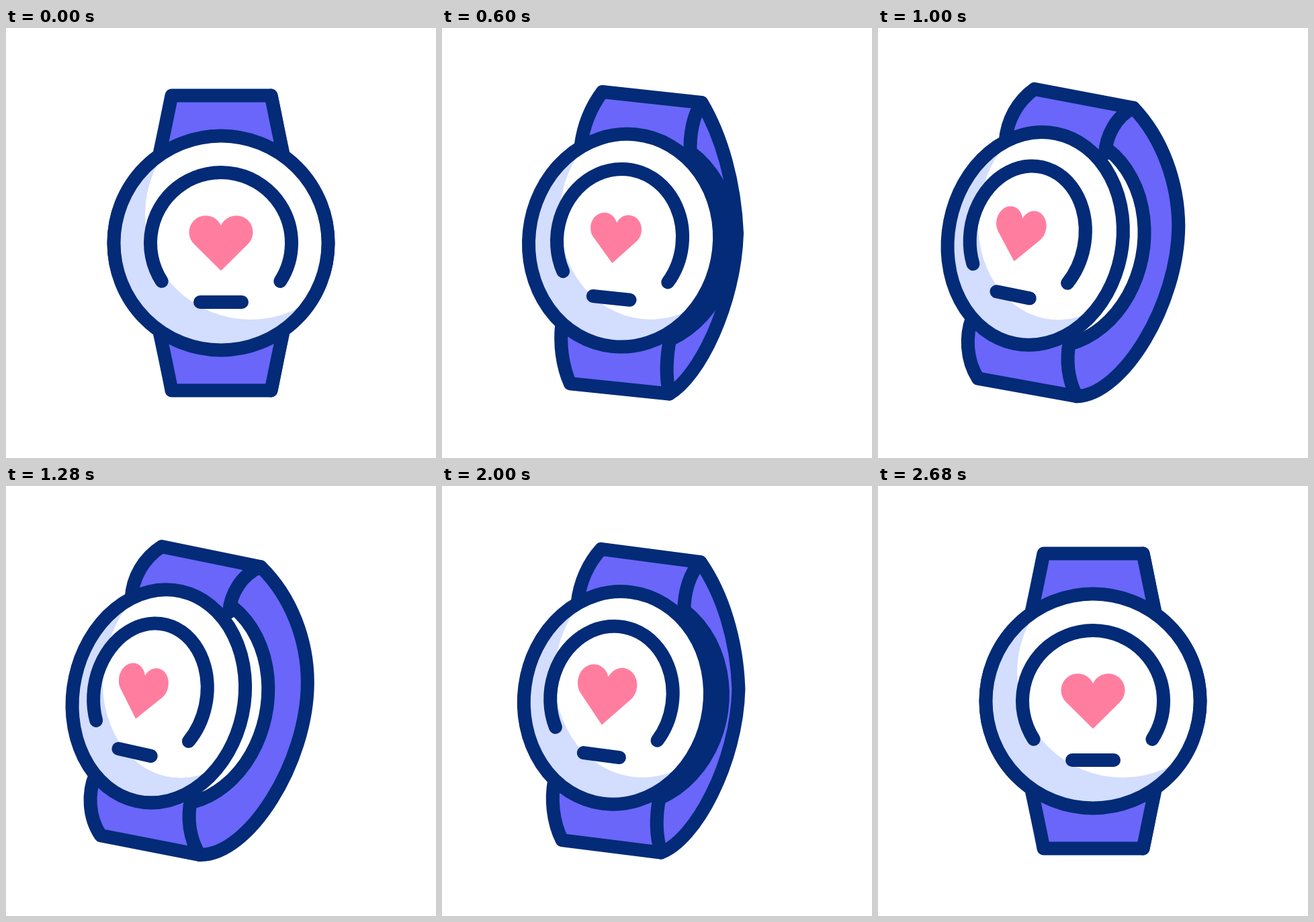
An HTML page with a canvas that plays this animation: 640x640 px, repeating every 3000 ms.

```html
<!DOCTYPE html>
<html lang="en">
<head>
<meta charset="utf-8">
<title>Smartwatch</title>
<style>
  html, body { margin: 0; width: 100%; height: 100%; overflow: hidden; background: #fff; }
  canvas { display: block; width: 640px; height: 640px; }
</style>
</head>
<body>
<canvas id="stage" width="640" height="640"></canvas>
<script>
const ctx = document.getElementById('stage').getContext('2d');
const NAVY = '#032b77', VIOLET = '#6966f9', PINK = '#ff7ea0', SHADE = '#d3ddfd';
const LOOP = 3000, STEP = 40, START = 200, TURN = 1440, END = 2680;

// Strap points: x, y facing front, then x, y fully turned.
const TOP_LEFT = [246.5, 100.5, 231.5, 90], TOP_RIGHT = [394.5, 100.5, 379, 120.5];
const LOW_LEFT = [246.5, 539.5, 140, 520], LOW_RIGHT = [394.5, 539.5, 287, 549];
const EDGE = {
  topLeft: [[229, 185, 186, 168], [235, 157, 188, 135], [241, 128, 205, 107], TOP_LEFT],
  topFold: [TOP_RIGHT, [400, 128, 350, 132], [406, 157, 334, 160], [412, 185, 331, 188]],
  lowLeft: [[229, 455, 132, 430], [235, 483, 121, 455], [241, 511, 121, 492], LOW_LEFT],
  lowFold: [LOW_RIGHT, [400, 512, 272, 525], [406, 483, 268, 495], [412, 455, 274, 466]],
  sideTop: [TOP_RIGHT, [406, 156, 425, 165], [421, 228, 449, 230], [428, 320, 449, 292]],
  sideLow: [[428, 320, 449, 292], [421, 412, 449, 412], [406, 484, 360, 552], LOW_RIGHT]
};

const PULSE = [[START, 1], [440, .875], [900, .97], [1440, .985], [1800, 1.02], [2190, 1.13], [END, 1]];

const mix = (a, b, k) => a + (b - a) * k;
const clamp = v => Math.min(1, Math.max(0, v));

function ease(x1, x2, u) {
  let lo = 0, hi = 1;
  for (let i = 0; i < 24; i++) {
    const s = (lo + hi) / 2, r = 1 - s;
    if (3 * r * r * s * x1 + 3 * r * s * s * x2 + s * s * s < u) lo = s; else hi = s;
  }
  return lo * lo * (3 - 2 * lo);
}

function turnAt(t) {
  if (t <= START || t >= END) return 0;
  return t < TURN
    ? ease(.33, .17, (t - START) / (TURN - START))
    : 1 - ease(.73, .24, (t - TURN) / (END - TURN));
}

function pulseAt(t) {
  if (t <= START || t >= END) return 1;
  const i = PULSE.findIndex(k => t < k[0]);
  const [t0, a] = PULSE[i - 1], [t1, b] = PULSE[i];
  const u = (t - t0) / (t1 - t0);
  return mix(a, b, u * u * (3 - 2 * u));
}

function paint(fill, stroke) {
  if (fill) { ctx.fillStyle = fill; ctx.fill(); }
  if (stroke) { ctx.strokeStyle = stroke; ctx.stroke(); }
}

// Joins curves with lines and leaves the path open.
function trace(p, ...curves) {
  const at = q => [mix(q[0], q[2], p), mix(q[1], q[3], p)];
  ctx.beginPath();
  for (const [a, b, c, d] of curves) {
    ctx.lineTo(...at(a));
    ctx.bezierCurveTo(...at(b), ...at(c), ...at(d));
  }
}

// Builds a path in the tilted plane of the dial; line width stays even.
function onDial(p, dx, dy, build, scale = 1) {
  const k = scale;
  ctx.save();
  ctx.transform((1 - .222 * p) * k, .176 * p * k, -.211 * p * k, (1 - .022 * p) * k,
    320 - 93.5 * p + dx, 320 - 7.2 * p + dy);
  ctx.beginPath();
  build();
  ctx.restore();
}

const circle = (x, y, r) => () => ctx.arc(x, y, r, 0, 2 * Math.PI);

function ring() {
  const a = Math.atan2(57, 88.5);
  ctx.arc(0, 0, 105, Math.PI - a, a);
}

function bar() {
  ctx.moveTo(-31, 88);
  ctx.lineTo(31, 88);
}

function heart() {
  const r = 24.8, x = 22.7, y = -16, notch = Math.acos(x / r);
  ctx.moveTo(0, 41.3);
  ctx.arc(-x, y, r, Math.PI * .75, -notch);
  ctx.arc(x, y, r, Math.PI + notch, Math.PI * 2.25);
  ctx.closePath();
}

function draw(t) {
  const p = turnAt(t);
  const depth = t < TURN ? p : clamp((p - .2) / .8);

  ctx.fillStyle = '#fff';
  ctx.fillRect(0, 0, 640, 640);
  ctx.lineWidth = 20;
  ctx.lineJoin = ctx.lineCap = 'round';

  trace(p, EDGE.sideTop, EDGE.sideLow, EDGE.lowFold, [...EDGE.topFold].reverse());
  paint(VIOLET);
  trace(p, EDGE.sideTop, EDGE.sideLow);
  paint(null, NAVY);

  onDial(p, 34.5 * depth, 3 * depth, circle(0, 0, 159.5));
  paint('#fff', NAVY);

  trace(p, EDGE.topLeft, EDGE.topFold);
  paint(VIOLET, NAVY);
  trace(p, EDGE.lowLeft, EDGE.lowFold);
  paint(VIOLET, NAVY);

  const face = circle(0, 0, 159.5);
  onDial(p, 0, 0, face);
  paint(SHADE);
  ctx.save();
  ctx.clip();
  onDial(p, 0, 0, circle(44, -43, 157));
  paint('#fff');
  ctx.restore();
  onDial(p, 0, 0, face);
  paint(null, NAVY);

  onDial(p, -12.5 * p, -4 * p, ring);
  paint(null, NAVY);
  onDial(p, -17.5 * p, -2.5 * p, bar);
  paint(null, NAVY);
  onDial(p, -26 * p, -6 * p, heart, pulseAt(t));
  paint(PINK);
}

function tick() {
  const t = performance.now() % LOOP;
  draw(Math.floor(t / STEP) * STEP);
  requestAnimationFrame(tick);
}
tick();
</script>
</body>
</html>
```
